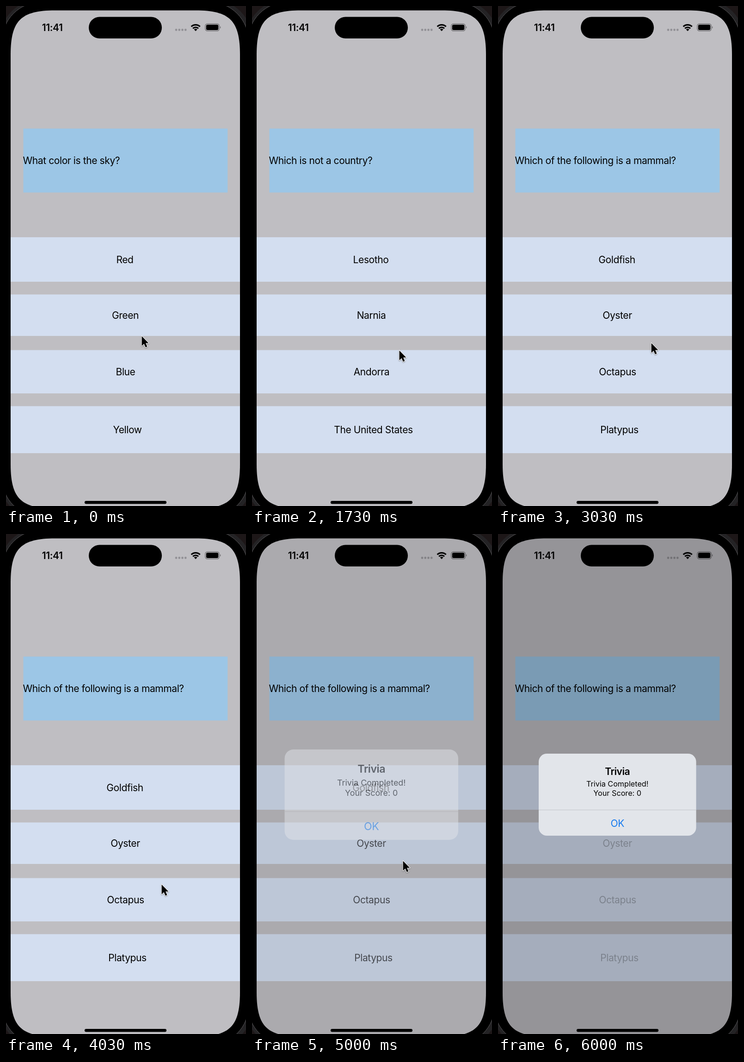
Recreate the animation shown at these times as an HTML page. Size 519 by 1079 pixels, loop 6530 ms.

```html
<!DOCTYPE html>
<html lang="en">
<head>
<meta charset="utf-8">
<title>Trivia</title>
<style>
  html, body { margin: 0; width: 100%; height: 100%; overflow: hidden; background: #1d1718; }
  svg { display: block; width: 519px; height: 1079px; }
  text { font: 21px Inter, "Open Sans", sans-serif; font-optical-sizing: none; letter-spacing: -.4px; }
  .mid { text-anchor: middle; }
  .bold { font-weight: 600; }
  .small { font-size: 16.2px; letter-spacing: 0; }
</style>
</head>
<body>
<svg viewBox="0 0 519 1079">
  <defs>
    <path id="screen" d="M10 105.5C10 31.5 32 9.5 106 9.5H410C484 9.5 506 31.5 506 105.5
      V988.5C506 1062.5 484 1084.5 410 1084.5H106C32 1084.5 10 1062.5 10 988.5Z"/>
  </defs>

  <!-- phone body -->
  <rect x="-16" y="-16" width="551" height="1127" rx="95" fill="#242325"/>
  <rect x="-9" y="-9" width="534" height="1112" rx="86" stroke="#59585a"/>
  <use href="#screen" fill="#bfbec2"/>

  <rect x="37.5" y="264.5" width="441.7" height="138" fill="#9cc6e6"/>
  <g id="answers"></g>
  <path d="M368 51.5h21" stroke="#929196" stroke-width="4.8" stroke-linecap="round" stroke-dasharray="0 6.75"/>
  <use id="shade" href="#screen"/>
  <text id="question" x="36.5" y="341"></text>

  <!-- status bar -->
  <text class="mid bold" x="100.2" y="54">11:41</text>
  <rect x="179" y="23.5" width="158" height="46.5" rx="23.2"/>
  <g fill="none" stroke="#000" stroke-width="3.2">
    <path d="M400.6 44.4a13.6 13.6 0 0 1 19 0M404.2 48.4a8.4 8.4 0 0 1 11.8 0"/>
    <path d="M406.6 50.6a5 5 0 0 1 7 0l-3.5 3.6z" fill="#000" stroke="none"/>
  </g>
  <rect x="430.8" y="38.3" width="30.5" height="15.6" rx="4.8" fill="none" stroke="#000" stroke-opacity=".45" stroke-width="1.2"/>
  <rect x="432.8" y="40.3" width="26.5" height="11.6" rx="3.2"/>
  <path d="M463 43.5q2.6 2.6 0 5.2z" opacity=".5"/>
  <rect x="170" y="1068" width="177" height="6.4" rx="3.2"/>

  <g id="alert">
    <rect x="88" y="474" width="340.5" height="177" rx="17.5" fill="#e2e5ea"/>
    <path d="M88 595.5H428.5" stroke="#c3c6cb"/>
    <text class="mid bold" x="258.2" y="519.5">Trivia</text>
    <text class="mid small" x="258.2" y="545">Trivia Completed!</text>
    <text class="mid small" x="258.2" y="565">Your Score: 0</text>
    <text class="mid" x="258.2" y="631.5" fill="#157aef">OK</text>
  </g>

  <path id="cursor" d="M.6 1.4V22.4L5.4 18L8.8 25.6L12.4 24L9.1 16.6H15.4Z"
    stroke="#fff" stroke-width="2.2" stroke-linejoin="round" paint-order="stroke"
    style="filter:drop-shadow(0 1px 1px #0006)"/>
</svg>
<script>
const LOOP = 6530, ALERT = 4965, CURSOR_OFF = 5150;
const $ = id => document.getElementById(id);

const rounds = [
  { at: 0, ask: "What color is the sky?", options: ["Red", "Green", "Blue", "Yellow"] },
  { at: 950, ask: "Which is not a country?", options: ["Lesotho", "Narnia", "Andorra", "The United States"] },
  { at: 2400, ask: "Which of the following is a mammal?", options: ["Goldfish", "Oyster", "Octapus", "Platypus"] }
];

const buttons = [
  { top: 499, height: 96, mid: 257 },
  { top: 622.5, height: 89.5, mid: 258 },
  { top: 742.5, height: 93.5, mid: 258.5 },
  { top: 863.5, height: 101.5, mid: 262.5 }
];

// start, duration, x, y
const home = [293, 711];
const moves = [
  [300, 270, 319, 908],
  [980, 720, 318, 742],
  [1780, 320, 320, 766],
  [2450, 320, 331, 726],
  [3530, 200, 339, 702],
  [3900, 130, 336, 755],
  [4200, 370, 326, 704]
];

$("answers").innerHTML = buttons.map(({ top, height, mid }) =>
  `<rect x="10" y="${top}" width="496" height="${height}" fill="#d3def0"/>
   <text class="mid" x="${mid}" y="${top + height / 2 + 7.8}"></text>`).join("");
const labels = $("answers").querySelectorAll("text");

const mix = (a, b, k) => a + (b - a) * k;

function ease(u) {
  u = Math.min(1, Math.max(0, u));
  return u * u * (3 - 2 * u);
}

function cursorAt(t) {
  return moves.reduce(([x, y], [start, length, toX, toY]) => {
    const k = ease((t - start) / length);
    return [mix(x, toX, k), mix(y, toY, k)];
  }, home);
}

// critically damped spring
function spring(ms) {
  const w = Math.max(0, ms) * .0455;
  return 1 - (1 + w) * Math.exp(-w);
}

let shown;
function draw(t) {
  const round = rounds.findLast(r => t >= r.at);
  if (round !== shown) {
    shown = round;
    $("question").textContent = round.ask;
    labels.forEach((label, i) => label.textContent = round.options[i]);
  }

  const p = spring(t - ALERT), scale = mix(1.2, 1, p);
  const tint = [158, 165, 179].map(c => c * p);
  $("answers").setAttribute("fill", `rgb(${tint})`);
  $("shade").setAttribute("opacity", .22 * p);
  $("alert").setAttribute("opacity", p);
  $("alert").setAttribute("transform", `translate(258.2 562.5) scale(${scale}) translate(-258.2 -562.5)`);
  $("cursor").setAttribute("transform", `translate(${cursorAt(t)})`);
  $("cursor").setAttribute("opacity", t < CURSOR_OFF ? 1 : 0);
}

const start = performance.now();
function tick() {
  draw((performance.now() - start) % LOOP);
  requestAnimationFrame(tick);
}
tick();
</script>
</body>
</html>
```
